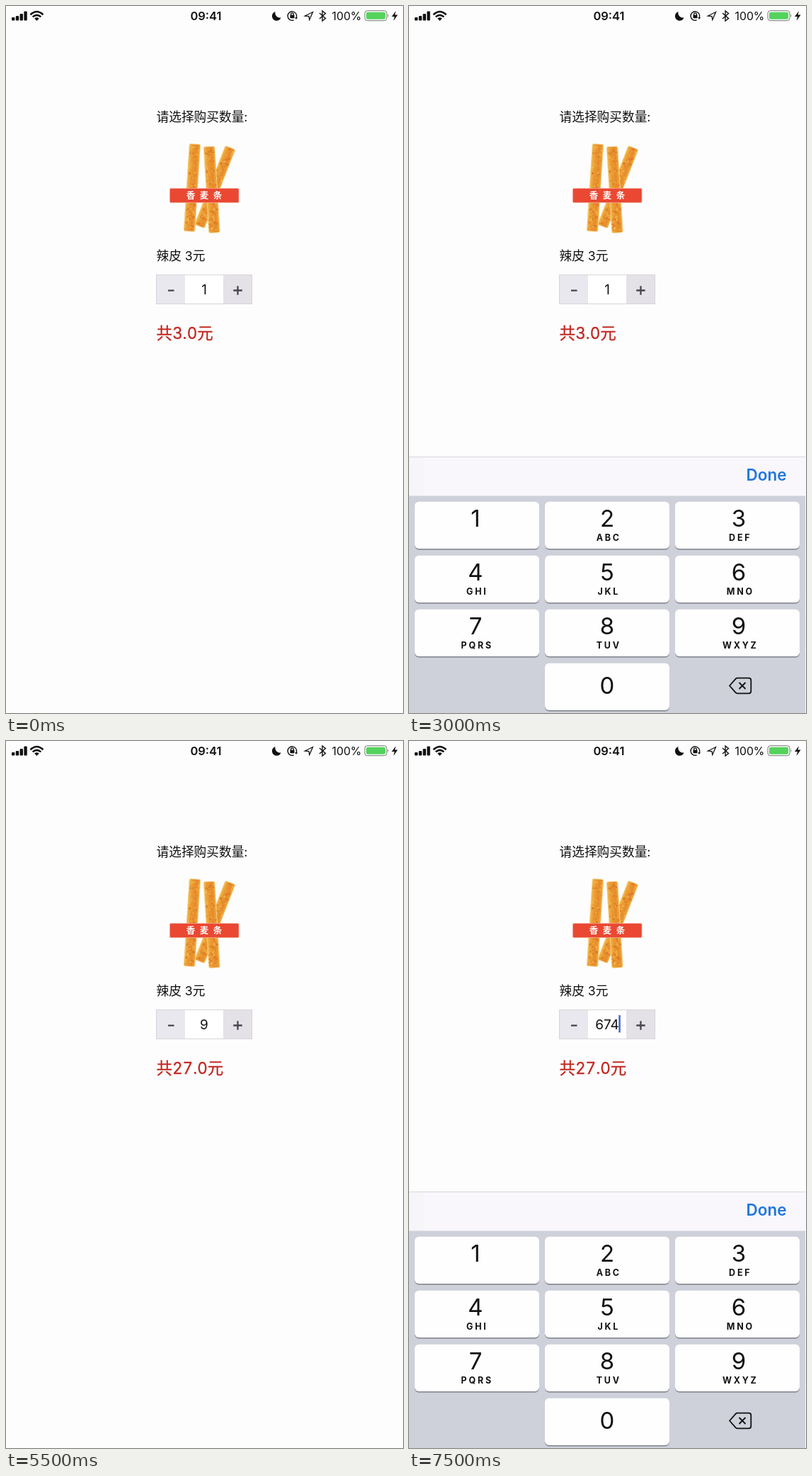
Recreate the animation shown at these times as an HTML page. Size 561x998 px, loop 8 s.

```html
<!DOCTYPE html>
<html lang="zh-CN">
<head>
<meta charset="utf-8">
<title>购买数量</title>
<style>
html, body { margin: 0; width: 100%; height: 100%; overflow: hidden; background: #fdfdfd; }
svg { display: block; width: 561px; height: 998px; font-family: Inter, "Noto Sans CJK SC", "Noto Sans CJK", sans-serif; fill: #111; }
.mid { text-anchor: middle; }
.digit { font-size: 33px; }
.letters { font-size: 12.5px; font-weight: 700; letter-spacing: 2.8px; }
.menu text { font-size: 18.5px; fill: #e9e8ea; text-anchor: middle; }
.menu .rule { stroke: #77747a; stroke-width: 1; }
#total { font-size: 22.5px; font-variant-numeric: tabular-nums; fill: #c1261f; stroke: #c1261f; stroke-width: .3; }
</style>
</head>
<body>
<svg viewBox="0 0 561 998" xmlns="http://www.w3.org/2000/svg">
  <defs>
    <clipPath id="field"><rect x="253" y="380" width="54" height="40"/></clipPath>
    <linearGradient id="crust">
      <stop offset="0" stop-color="#f3b84a"/>
      <stop offset=".3" stop-color="#eb9a32"/>
      <stop offset=".7" stop-color="#e58a2a"/>
      <stop offset="1" stop-color="#f0ac40"/>
    </linearGradient>
  </defs>
  <rect width="561" height="998" fill="#fdfdfd"/>

  <g id="status">
    <g id="bars"></g>
    <g fill="none" stroke="#111" stroke-width="2.6">
      <path d="M34.5 12.2Q43.5 3.8 52.5 12.2"/>
      <path d="M37.7 15.4Q43.5 10.2 49.3 15.4"/>
    </g>
    <path d="M40.2 17.5Q43.5 14.8 46.8 17.5L43.5 21Z"/>
    <text class="mid" x="282.5" y="20" font-size="16.5" font-weight="600">09:41</text>
    <path d="M380.5 8A6.5 6.5 0 1 0 388.5 16.5A7 7 0 0 1 380.5 8Z"/>
    <g fill="none" stroke="#111" stroke-width="1.4">
      <path d="M406.5 20A6.3 6.3 0 1 1 410.2 16.5"/>
      <path d="M402.6 13V11.8a1.9 1.9 0 0 1 3.800 0V13"/>
      <path d="M422.5 14L433.5 8.5L428.8 19.5L428 14.5Z" stroke-width="1.3"/>
      <path d="M443 10L451.5 17.5L447 21V7L451.5 10.5L443 18"/>
    </g>
    <rect x="401.500" y="12.800" width="6" height="4.400" rx=".8"/>
    <path d="M408.300 16L412.200 16.300L409.800 19Z"/>
    <text x="460.5" y="20" font-size="15.8">100%</text>
    <rect x="507" y="6.7" width="31" height="14" rx="3.5" fill="none" stroke="#777"/>
    <rect x="509" y="8.7" width="27" height="10" rx="2" fill="#53d35c"/>
    <path d="M539.5 11.5q2 2.2 0 4.4Z" fill="#777"/>
    <path d="M551 7L545 15H549L547.5 21L553.5 12.5H549.5Z"/>
  </g>

  <text x="212.5" y="162.5" font-size="17.7">请选择购买数量:</text>
  <g id="snack"></g>
  <rect x="231.5" y="257.5" width="97.5" height="20" rx="1.5" fill="#ea4832" stroke="#f3a294" stroke-width=".8"/>
  <g class="mid" font-size="12.5" font-weight="900" fill="#fff">
    <text x="261" y="272">香</text><text x="280" y="272">麦</text><text x="299" y="272">条</text>
  </g>
  <text x="212.5" y="359.3" font-size="17.7">辣皮 3元</text>

  <rect x="212.5" y="379.5" width="135" height="41" fill="#fff"/>
  <rect x="213" y="380" width="40" height="40" fill="#eae8ef"/>
  <rect x="307" y="380" width="40" height="40" fill="#e4e2e7"/>
  <rect x="212.5" y="379.5" width="135" height="41" fill="none" stroke="#d6d4da"/>
  <path d="M229 401.7H237.5M321.3 401.5H333.7M327.5 395.3V407.7" stroke="#48464c" stroke-width="2.3"/>
  <g clip-path="url(#field)">
    <rect id="shade" x="274" y="387" width="12" height="25" fill="#c5d9f3"/>
    <text id="count" class="mid" x="280" y="406.5" font-size="19"></text>
    <g id="handles" fill="#3b7bd8">
      <path d="M272.7 381h2.5v31h-2.5ZM284.9 387h2.5v31h-2.5Z"/>
      <circle cx="274" cy="380" r="7"/><circle cx="286.2" cy="419" r="7"/>
    </g>
    <rect id="caret" y="387" width="2.5" height="24.5" fill="#4068c4"/>
  </g>
  <text id="total" x="212.5" y="470"></text>
  <g id="pick" class="menu"></g>
  <g id="edit" class="menu"></g>
  <g id="pad"></g>
</svg>
<script>
const $ = id => document.getElementById(id);

function add(parent, tag, attrs, text) {
  const el = document.createElementNS('http://www.w3.org/2000/svg', tag);
  for (const k in attrs) el.setAttribute(k, attrs[k]);
  if (text) el.textContent = text;
  return parent.appendChild(el);
}

[4.5, 6.5, 9.5, 13].forEach((h, i) =>
  add($('bars'), 'rect', { x: 8 + i * 5.8, y: 20.5 - h, width: 4.4, height: h, rx: 1 }));

// Seeded noise for the seasoning on the sticks
let seed = 7;
const rnd = () => (seed = seed * 16807 % 2147483647) / 2147483647;

function stick(x1, y1, x2, y2, w) {
  const len = Math.hypot(x2 - x1, y2 - y1);
  const turn = Math.atan2(y2 - y1, x2 - x1) * 180 / Math.PI - 90;
  const g = add($('snack'), 'g', { transform: `translate(${x1} ${y1}) rotate(${turn})` });
  add(g, 'rect', { x: -w / 2, width: w, height: len, rx: 2, fill: 'url(#crust)', stroke: '#f7d38a', 'stroke-width': .8 });
  const tones = ['#f6bf52', '#cf6a22', '#f2b044', '#dc6526'];
  for (let i = 0; i < 90; i++) {
    add(g, 'circle', {
      cx: (rnd() - .5) * (w - 3), cy: 2 + rnd() * (len - 4),
      r: .6 + rnd() * 1.1, fill: tones[i % 4], opacity: .6
    });
  }
}
stick(317, 200, 273.5, 311, 15);
stick(267, 195, 259, 318, 15.5);
stick(287, 198.5, 294.5, 320, 15.5);

function menu(g, x, y, w, tip, fill, opacity, rules, items) {
  const r = x + w, b = y + 48;
  add(g, 'path', {
    d: `M${x + 10} ${y}H${r - 10}q10 0 10 10V${b - 10}q0 10 -10 10H${tip + 13}L${tip} ${b + 12.5}L${tip - 13} ${b}H${x + 10}q-10 0 -10 -10V${y + 10}q0 -10 10 -10Z`,
    fill, opacity
  });
  for (const rx of rules) add(g, 'path', { class: 'rule', d: `M${rx} ${y}V${b}` });
  for (const [label, cx] of items) add(g, 'text', { x: cx, y: y + 31.5 }, label);
}
menu($('pick'), 174.5, 313.3, 230.3, 290, '#1f1d20', 1, [275.5],
  [['Select', 226], ['Select All', 340.5]]);
menu($('edit'), 78.5, 315, 402, 279.5, '#343035', .93, [155.5, 247.5, 366.5],
  [['Cut', 117], ['Copy', 202], ['Look Up', 307.5], ['Share…', 423.5]]);

const pad = $('pad');
add(pad, 'rect', { y: 636, width: 560, height: 56, fill: '#f9f7fc' });
add(pad, 'rect', { y: 637, width: 21, height: 55, fill: '#f6f5f7' });
add(pad, 'path', { d: 'M0 636.5H560', stroke: '#d9d6da' });
add(pad, 'text', { class: 'mid', x: 505, y: 670, 'font-size': 22.5, 'font-weight': 600, fill: '#2176db' }, 'Done');
add(pad, 'rect', { y: 691.5, width: 560, height: 307, fill: '#ced0da' });

// Labels sit on a slightly wider pitch than the keys
function key(digit, letters, col, row) {
  const x = 8 + col * 184, y = 699.7 + row * 76, cx = 94.5 + col * 186;
  add(pad, 'rect', { x, y: y + 1.5, width: 176, height: 66.5, rx: 6, fill: '#8d8f98' });
  add(pad, 'rect', { x, y, width: 176, height: 66.3, rx: 6, fill: '#fefefe' });
  add(pad, 'text', { class: 'mid digit', x: cx - .5, y: y + (digit ? 35.5 : 43.7) }, String(digit));
  if (letters) add(pad, 'text', { class: 'mid letters', x: cx + 1.8, y: y + 55.2 }, letters);
}
['', 'ABC', 'DEF', 'GHI', 'JKL', 'MNO', 'PQRS', 'TUV', 'WXYZ']
  .forEach((letters, i) => key(i + 1, letters, i % 3, Math.floor(i / 3)));
key(0, '', 1, 3);
add(pad, 'path', {
  d: 'M453 959.5L461.5 949.8Q462.5 948.7 464 948.7H480Q483.3 948.7 483.3 952V967Q483.3 970.3 480 970.3H464Q462.5 970.3 461.5 969.2ZM466.5 955L475.5 964M475.5 955L466.5 964',
  fill: 'none', stroke: '#111', 'stroke-width': 1.8, 'stroke-linejoin': 'round'
});

// One row per half second: field text, quantity, keypad offset (null = hidden), mode
const STEP = 500;
const steps = [
  ['1', 1, null], ['2', 2, null], ['3', 3, null], ['2', 2, null], ['1', 1, null],
  ['1', 1, 78, 'caret'], ['1', 1, 0], ['10', 1, 0, 'caret'], ['10', 1, 0, 'caret'],
  ['10', 10, null], ['11', 11, null], ['9', 9, null],
  ['9', 9, 78, 'pick'], ['9', 9, 0, 'edit'], ['67', 9, 0, 'caret'], ['674', 9, 0, 'caret']
];
const show = (id, on) => { $(id).style.display = on ? '' : 'none'; };

let last = -1;
function draw(now) {
  const i = Math.floor(now / STEP) % steps.length;
  if (i !== last) {
    last = i;
    const [text, qty, drop, mode] = steps[i];
    $('count').textContent = text;
    $('total').textContent = `共${(qty * 3).toFixed(1)}元`;
    $('caret').setAttribute('x', 279.2 + 5.7 * text.length);
    show('caret', mode === 'caret' || mode === 'pick');
    show('pick', mode === 'pick');
    for (const id of ['edit', 'shade', 'handles']) show(id, mode === 'edit');
    show('pad', drop !== null);
    pad.setAttribute('transform', `translate(0 ${drop || 0})`);
  }
  requestAnimationFrame(() => draw(performance.now() - start));
}
const start = performance.now();
draw(0);
</script>
</body>
</html>
```
